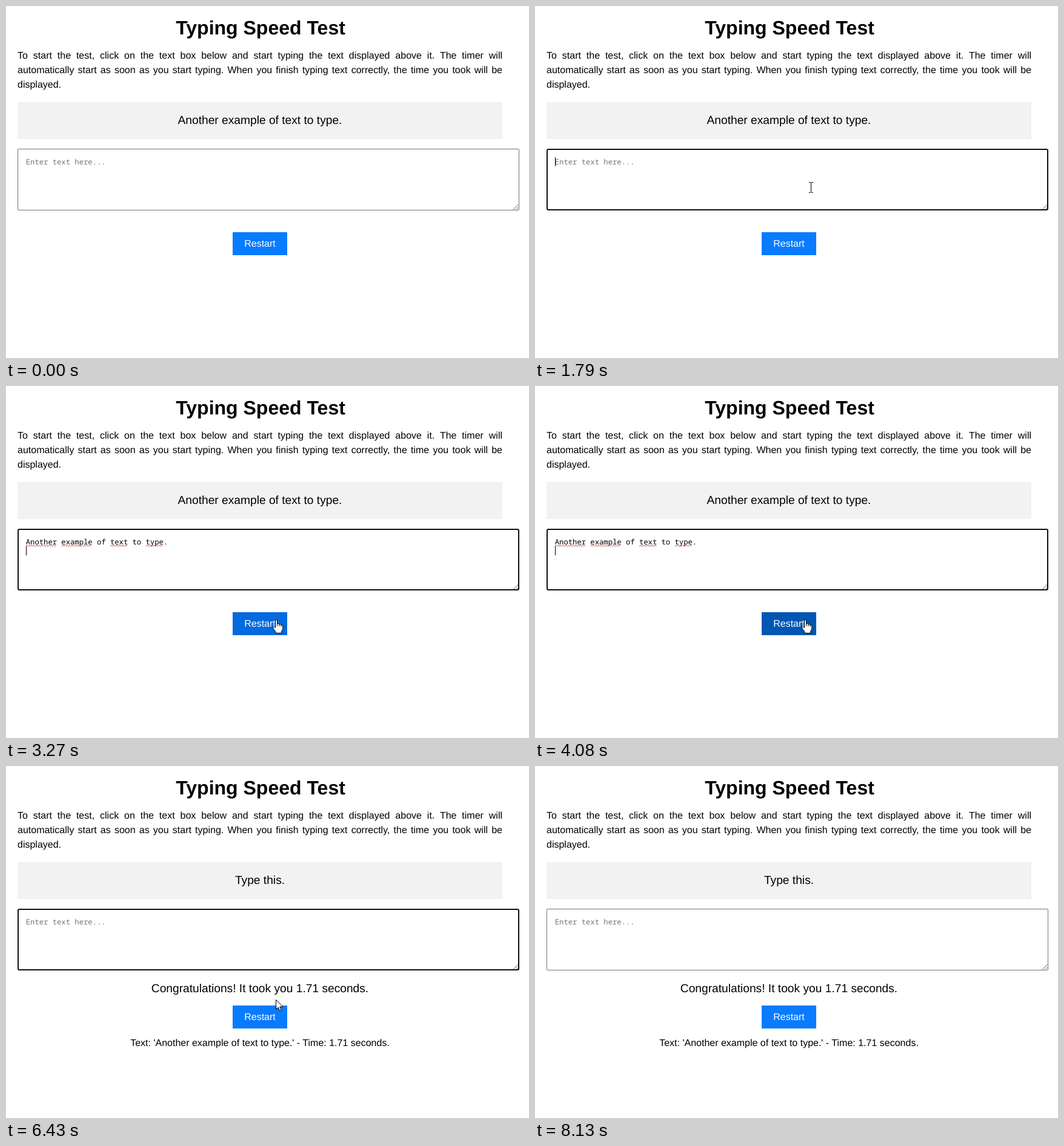
Animation, 863 px wide and 582 px high, one loop 8200 ms. Source, as an HTML page with a canvas:

```html
<!DOCTYPE html>
<html lang="en">
<head>
<meta charset="utf-8">
<title>Typing Speed Test</title>
<style>
html, body { margin: 0; width: 100%; height: 100%; overflow: hidden; background: #fff; }
body { position: relative; font: 16px/24px "Liberation Sans", Arial, sans-serif; color: #000; text-rendering: geometricPrecision; }
body > * { position: absolute; margin: 0; left: 19px; width: 800px; text-align: center; box-sizing: border-box; }
h1 { left: 20px; top: 12px; font-size: 32px; line-height: 48px; }
#intro { top: 71px; text-align: justify; }
#prompt { top: 159px; height: 61px; padding-top: 17px; background: #f2f2f2; }
#prompt, #result { font-size: 19.2px; line-height: 28.8px; }
#entry { left: 32.8px; top: 250px; text-align: left; white-space: pre; font: 12.217px/15px "Noto Sans Mono", monospace; }
#result { top: 355px; }
#restart { left: 374px; width: 90px; height: 38px; line-height: 40px; color: #fff; }
#history { top: 447px; }
canvas { left: 0; top: 0; width: 863px; height: 582px; }
</style>
</head>
<body>
<h1>Typing Speed Test</h1>
<p id="intro">To start the test, click on the text box below and start typing the text displayed above it. The timer will automatically start as soon as you start typing. When you finish typing text correctly, the time you took will be displayed.</p>
<div id="prompt"></div>
<div id="entry"></div>
<div id="result">Congratulations! It took you 1.71 seconds.</div>
<div id="restart">Restart</div>
<div id="history">Text: 'Another example of text to type.' - Time: 1.71 seconds.</div>
<canvas id="stage" width="863" height="582"></canvas>
<script>
const LOOP = 8200, STEP = 70;
const FOCUS = 1790, TYPE = 2240, ENTER = 2990, HOVER = 3070, SPELL = 3270, CLICK = 4830, BLUR = 8130;
const PHRASE = 'Another example of text to type.';
const CHAR = 7.33, TEXT_X = 32.8;
const IDLE_BLUE = [8, 123, 255], HOVER_BLUE = [0, 86, 179];

// Times at which the text caret switches on or off
const BLINKS = [FOCUS, 3550, 4080, 4630, CLICK, 5370, 5900, 6430, 6960, 7500, 8070, BLUR];

// Pointer path: time, x, y
const PATH = [
  [400, 785, 566], [680, 757, 516], [1030, 640, 390], [1100, 612, 364], [1170, 569, 335],
  [1240, 530, 318], [1590, 455, 300], [2920, 455, 300], [2990, 445, 359], [3070, 445, 372],
  [3200, 445, 386], [6430, 445, 386], [6850, 460, 315], [7200, 470, 258], [7270, 474, 237],
  [7340, 500, 300], [7410, 560, 410], [7530, 641, 539], [7600, 641, 539]
];

const ARROW = new Path2D('M.5 .5V16.5L4.2 13L6.6 18.6L9.2 17.5L6.8 12H11.8Z');
const HAND = new Path2D('M-.5 2Q-.5.5 1 .5Q2.5.5 2.5 2V7Q5.5 6 5.8 8Q8.6 7 9 9Q11.8 8.4 11.8 11V16L9.5 20V22.5H0V20.5L-4 15Q-5.5 12.5-3.5 11.5Q-2 11.5-.5 14Z');
const KNUCKLES = new Path2D('M2.5 7V11M5.8 8V11.5M9 9V12');
const BEAM = new Path2D('M-3 -8.5H-1L.5 -7.5L2 -8.5H4M.5 -7.5V7.5M-3 8.5H-1L.5 7.5L2 8.5H4');

const el = id => document.getElementById(id);
const [promptBox, entry, result, restart, pastRuns] = ['prompt', 'entry', 'result', 'restart', 'history'].map(el);
const ctx = el('stage').getContext('2d');

const clamp = v => Math.min(1, Math.max(0, v));
const smooth = v => v * v * (3 - 2 * v);
const mix = (a, b, k) => a + (b - a) * k;
const snap = (t, start, step = STEP) => start + Math.floor((t - start) / step) * step;

function pointerAt(t) {
  const i = PATH.findIndex(p => t < p[0]);
  if (i < 1) return null;
  const a = PATH[i - 1], b = PATH[i];
  const k = (snap(t, a[0]) - a[0]) / (b[0] - a[0]);
  return [Math.round(mix(a[1], b[1], k)), Math.round(mix(a[2], b[2], k))];
}

function typedCount(t) {
  if (t < TYPE || t >= CLICK) return 0;
  const steps = Math.floor((t - TYPE) / STEP) + 1;
  return Math.min(PHRASE.length, Math.round(steps * 3.2));
}

function hoverAmount(t) {
  if (t < HOVER) return 0;
  if (t < CLICK) return smooth(clamp((snap(t, HOVER) - HOVER) / 300));
  return 1 - smooth(clamp((snap(t, CLICK, 65) - 4860) / 200));
}

function drawField(focused) {
  ctx.beginPath();
  ctx.strokeStyle = '#555';
  ctx.lineWidth = 1;
  ctx.moveTo(837, 336.5); ctx.lineTo(845.5, 328);
  ctx.moveTo(842, 336.5); ctx.lineTo(845.5, 333);
  ctx.stroke();
  ctx.beginPath();
  if (focused) {
    ctx.strokeStyle = '#101010';
    ctx.lineWidth = 2;
    ctx.roundRect(20, 237, 826, 100, 2);
  } else {
    ctx.strokeStyle = '#767676';
    ctx.roundRect(19.5, 236.5, 827, 101, 1.5);
  }
  ctx.stroke();
}

function drawSquiggles() {
  ctx.strokeStyle = '#f03030';
  ctx.lineWidth = 1;
  ctx.beginPath();
  for (const word of ['Another', 'example', 'text', 'type']) {
    const x0 = TEXT_X + PHRASE.indexOf(word) * CHAR;
    const x1 = x0 + word.length * CHAR;
    ctx.moveTo(x0, 265);
    for (let x = x0 + 2, up = true; x < x1; x += 2, up = !up) ctx.lineTo(x, up ? 263.3 : 265);
  }
  ctx.stroke();
}

function drawPointer(x, y, t) {
  const overField = x >= 19 && x < 847 && y >= 236 && y < 338;
  const overButton = t >= HOVER && t < CLICK;
  ctx.save();
  ctx.translate(x, y);
  ctx.lineWidth = 1;
  ctx.strokeStyle = '#000';
  ctx.fillStyle = '#fff';
  if (overField) {
    ctx.stroke(BEAM);
  } else {
    const shape = overButton ? HAND : ARROW;
    ctx.fill(shape);
    ctx.stroke(shape);
    if (overButton) ctx.stroke(KNUCKLES);
  }
  ctx.restore();
}

function render(t) {
  const done = t >= CLICK;
  const count = typedCount(t);
  promptBox.textContent = done ? 'Type this.' : PHRASE;
  entry.textContent = count ? PHRASE.slice(0, count) : 'Enter text here...';
  entry.style.color = count ? '#000' : '#757575';
  result.style.visibility = pastRuns.style.visibility = done ? 'visible' : 'hidden';

  const h = hoverAmount(t);
  const blue = IDLE_BLUE.map((v, i) => Math.round(mix(v, HOVER_BLUE[i], h)));
  restart.style.top = (done ? 396 : 374) + 'px';
  restart.style.background = `rgb(${blue})`;

  ctx.clearRect(0, 0, 863, 582);
  drawField(t >= FOCUS && t < BLUR);
  if (t >= SPELL && !done) drawSquiggles();

  if (BLINKS.filter(b => t >= b).length % 2) {
    const newLine = t >= ENTER && !done;
    const col = newLine ? 0 : count;
    ctx.fillStyle = '#000';
    ctx.fillRect(Math.round(TEXT_X + col * CHAR), newLine ? 265 : 250, 1, 15);
  }

  const pos = pointerAt(t);
  if (pos) drawPointer(...pos, t);
}

const begin = performance.now();
function tick() {
  render((performance.now() - begin) % LOOP);
  requestAnimationFrame(tick);
}
tick();
</script>
</body>
</html>
```
